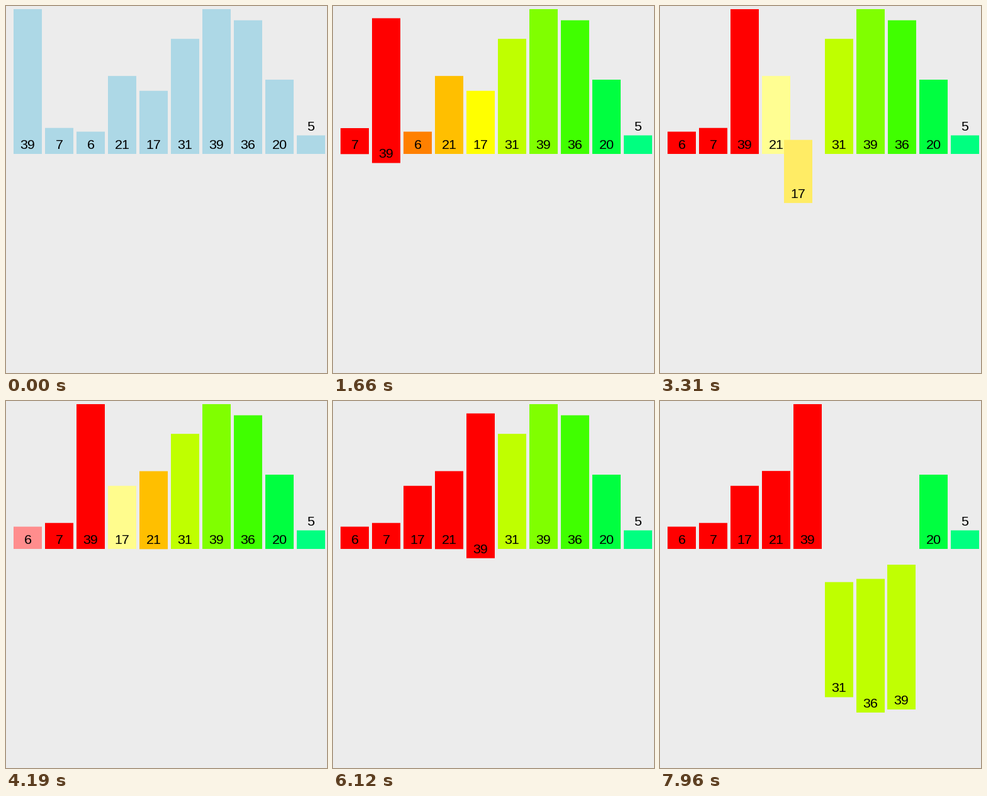
Write a matplotlib script that moves like this. It is 510 px wide and 583 px high and loops after 8 s.

```python
import numpy as np
import matplotlib.pyplot as plt
from matplotlib.animation import FuncAnimation
from matplotlib.patches import Rectangle

W, H = 510, 583
LOOP, INTERVAL = 8000, 20
VALUES = [39, 7, 6, 21, 17, 31, 39, 36, 20, 5]
N = len(VALUES)
BAR_W, PITCH, LEFT = 45, 50, 12
TOP_BASE, LOW_BASE = 235, 495
UNIT = 230 / max(VALUES)
TAU = 50.5          # time constant of the glide, ms
GLOW = 0.58         # brightening of bars being compared

BACK = "#ececec"
IDLE = np.array([173, 216, 230]) / 255
RAINBOW = np.array([
    (255, 0, 0), (255, 64, 0), (255, 128, 0), (255, 191, 0), (255, 255, 0),
    (191, 255, 0), (128, 255, 0), (64, 255, 0), (0, 255, 64), (0, 255, 128),
]) / 255


def slot_x(slot):
    return LEFT + PITCH * slot


def look(color, x, base):
    return np.array([x, base, *color])


def build_steps():
    """Merge sort as a list of steps; each step maps a bar to its new target."""
    order = list(range(N))
    hue = [c for c in RAINBOW]
    steps = [{i: look(hue[i], slot_x(i), TOP_BASE) for i in range(N)}]

    def glow(bar, slot):
        return look(np.minimum(1, hue[bar] + GLOW), slot_x(slot), TOP_BASE)

    def merge(lo, mid, hi):
        color = hue[order[lo]]
        a, b, merged = lo, mid, []
        steps.append({order[s]: glow(order[s], s) for s in (a, b)})
        while a < mid or b < hi:
            left = b >= hi or (a < mid and VALUES[order[a]] <= VALUES[order[b]])
            bar = order[a] if left else order[b]
            a, b = (a + 1, b) if left else (a, b + 1)
            hue[bar] = color
            step = {bar: look(color, slot_x(lo + len(merged)), LOW_BASE)}
            if a < mid and b < hi:
                step.update({order[s]: glow(order[s], s) for s in (a, b)})
            merged.append(bar)
            steps.append(step)
        order[lo:hi] = merged
        for s in range(lo, hi):
            steps.append({order[s]: look(color, slot_x(s), TOP_BASE)})

    def sort(lo, hi):
        if hi - lo > 1:
            mid = (lo + hi + 1) // 2
            sort(lo, mid)
            sort(mid, hi)
            merge(lo, mid, hi)

    sort(0, N)
    return steps


# Pacing: step number -> start time, and redraw number -> time
STEPS = build_steps()[:40]
STARTS = np.interp(range(len(STEPS)),
                   [0, 5, 14, 22, 23, 28, 31, 32, 37, 38, 39],
                   [520, 1514, 3292, 4760, 4962, 5975, 6605, 6793, 7760, 7955, 8150])
TICKS = np.interp(range(86), [0, 13, 32, 51, 64, 72, 85],
                  [540, 1660, 3310, 4960, 6120, 6810, 7960])


def pose(t):
    """Position and colour of every bar at time t."""
    now = np.array([look(IDLE, slot_x(i), TOP_BASE) for i in range(N)])
    goal = now.copy()
    clock = 0
    for start, step in zip(STARTS, STEPS):
        if start > t:
            break
        now = goal + (now - goal) * np.exp((clock - start) / TAU)
        clock = start
        for bar, target in step.items():
            goal[bar] = target
    return goal + (now - goal) * np.exp((clock - t) / TAU)


# The small surplus keeps rounding from losing a pixel
fig = plt.figure(figsize=((W + 0.01) / 100, (H + 0.01) / 100), dpi=100, facecolor=BACK)
ax = fig.add_axes([0, 0, 1, 1])
ax.set_xlim(0, W)
ax.set_ylim(H, 0)
ax.axis("off")

bars, labels = [], []
for i, v in enumerate(VALUES):
    bar = Rectangle((0, 0), BAR_W, v * UNIT, linewidth=0, snap=False, zorder=2 + i)
    bars.append(ax.add_patch(bar))
    labels.append(ax.text(0, 0, str(v), family="Liberation Sans", fontsize=21.5 * 0.72,
                          color="black", ha="center", va="baseline", zorder=2.5 + i))


def draw(frame):
    k = np.searchsorted(TICKS, frame * INTERVAL + INTERVAL / 2, side="right") - 1
    state = pose(TICKS[k] if k >= 0 else 0)
    for bar, label, v, (x, base, *color) in zip(bars, labels, VALUES, state):
        height = v * UNIT
        bar.set_xy((x, base - height))
        bar.set_facecolor(np.clip(color, 0, 1))
        lift = 8 if height > 32 else height + 7.5
        label.set_position((x + BAR_W / 2, base - lift))
    return bars + labels


anim = FuncAnimation(fig, draw, frames=LOOP // INTERVAL, interval=INTERVAL,
                     init_func=lambda: draw(0), repeat=True, repeat_delay=0, blit=False)
plt.show()
```
